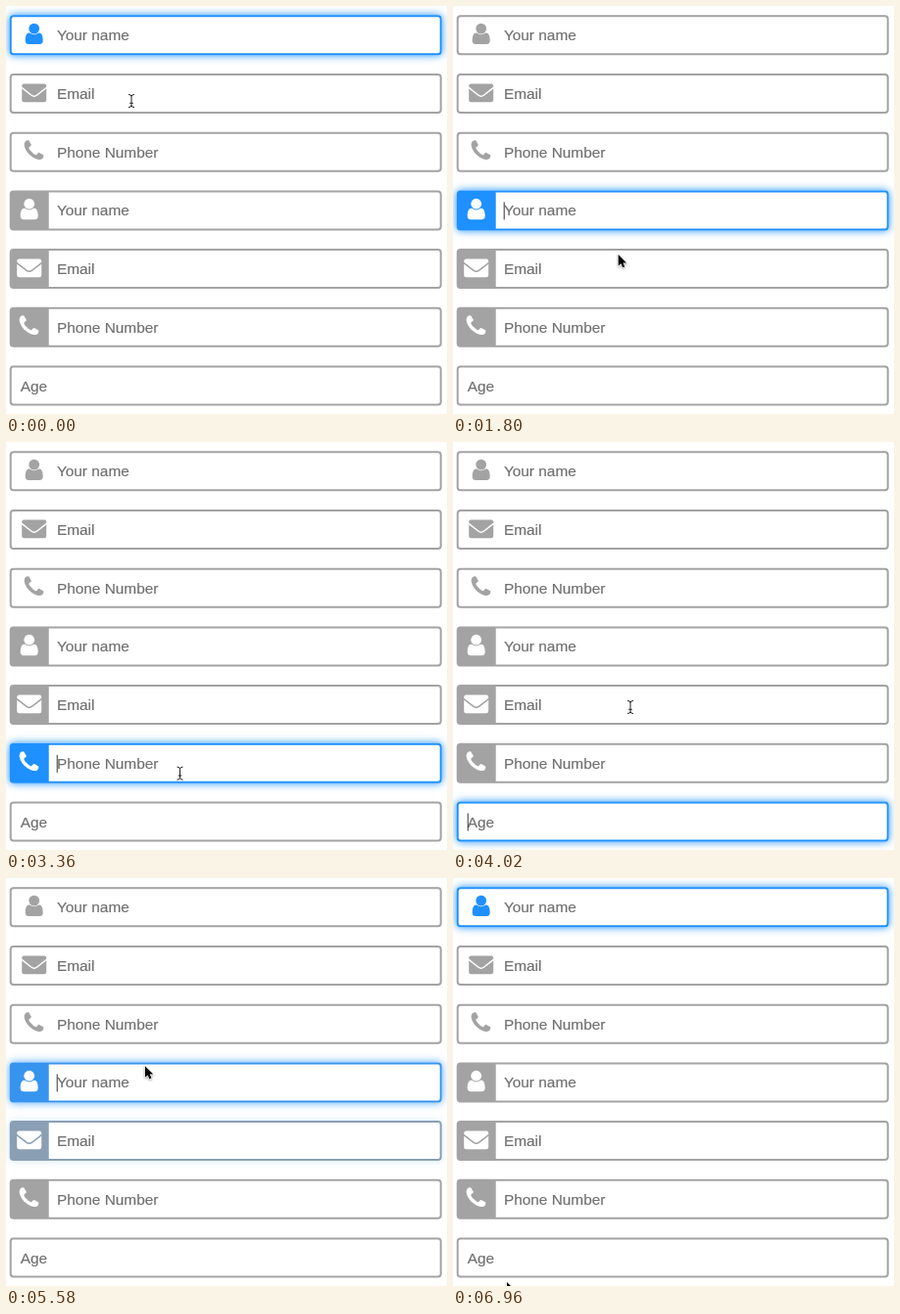
An HTML page that plays this animation: 450 px wide and 417 px high, repeating every 7020 ms.

```html
<!DOCTYPE html>
<html lang="en">
<head>
<meta charset="utf-8">
<title>Input focus</title>
<style>
  html, body { margin: 0; width: 100%; height: 100%; overflow: hidden; background: #fff; }
  #stage { position: relative; width: 450px; height: 417px; overflow: hidden; }
  .row {
    position: absolute; left: 0; top: 0; width: 441px; height: 41px; box-sizing: border-box;
    border: 2px solid var(--c); border-radius: 4px;
    box-shadow: 0 0 8px rgb(30 144 255 / var(--k));
    font: 15.4px/37px "Liberation Sans", Arial, sans-serif;
    color: #707070; -webkit-text-stroke: .2px #707070;
  }
  .row > * { position: absolute; }
  .row span { left: 46.2px; top: 0; white-space: nowrap; }
  .row i { left: 46px; top: 10px; width: 1px; height: 18px; background: #333; }
  .row svg { left: 22.5px; top: 17px; width: 1px; height: 1px; overflow: visible; fill: var(--c); stroke: #fff; }
  .row b { left: -1px; top: -1px; width: 39px; height: 39px; background: var(--c); border-radius: 2px 0 0 2px; }
  .filled svg { left: 18px; fill: #fff; stroke: var(--c); }
  .bare span { left: 9px; }
  .bare i { left: 9px; }
  #pointer { position: absolute; left: 0; top: 0; width: 1px; height: 1px; overflow: visible; }
  #arrow { stroke: #fff; stroke-width: 1.2; paint-order: stroke; filter: drop-shadow(0 1px 1px rgb(0 0 0 / .35)); }
  #beam { fill: none; stroke: #222; filter: drop-shadow(0 0 .6px #fff); }
</style>
</head>
<body>
<div id="stage"></div>
<script>
const LOOP = 7020, STEP = 60, FADE = 300, GLIDE = 300, BLINK = 500;
const PITCH = 59.7, TOP = 9.3, HEIGHT = 41;
const GRAY = [163, 163, 163], BLUE = [30, 144, 255];

// half of the handset; the other half is its mirror image
const half = 'M-4.4 5Q-7.7 1.7-8.9-1.4Q-9.9-4-9.9-5.1Q-9.9-9.9-5.7-9.9Q-5-9.9-4.7-8.8L-3.3-6.4Q-2.7-5.4-2.7-5.1Q-2.7-4.6-3.9-3.6T-5.2-2.3Q-5.2-.8-1.9 2.5Z';
const icons = {
  user: `<g stroke="none"><circle cy="-5.2" r="5.4"/>
    <path d="M-9 7C-9 1-7-.7-4.6-.7Q0 2.7 4.6-.7C7-.7 9 1 9 7Q9 10.8 5.6 10.8H-5.6Q-9 10.8-9 7Z"/></g>`,
  mail: `<g transform="translate(0 .8)"><rect x="-12.5" y="-9.4" width="25" height="18.8" rx="2.2" stroke="none"/>
    <path d="M-13-5.6L-3 2.2Q0 4.5 3 2.2L13-5.6" fill="none" stroke-width="1.5"/></g>`,
  phone: `<g stroke="none" transform="translate(-.2 -.6)"><path d="${half}"/>
    <path d="${half}" transform="matrix(0 -1 -1 0 0 0)"/></g>`,
};
const labels = { user: 'Your name', mail: 'Email', phone: 'Phone Number' };

// pointer stops: [arrival, x, y, pause before the click]; no pause means no click
const stops = [
  [0, 128, 97, 180], [840, 121, 142, 0], [1440, 152, 222, 60], [1910, 176, 268, 360],
  [2640, 177, 332, 400], [3600, 182, 396, 90], [4020, 181, 271], [4380, 176, 330, 100],
  [4900, 162, 270, 60], [5360, 144, 214, 60], [5760, 138, 152, 60], [6030, 134, 90, 60],
  [6300, 130, 36, 60], [6660, 50, 240], [6960, 55, 413],
];
const clicks = stops.filter(s => s.length > 3)
  .map(([time, , y, pause]) => ({ time: time + pause, row: Math.floor(y / PITCH) }));

const clamp = x => Math.min(1, Math.max(0, x));
const smooth = x => x * x * (3 - 2 * x);
const easeOut = x => 1 - (1 - x) ** 2.2;
const mix = (a, b, u) => a + (b - a) * u;

const stage = document.getElementById('stage');
const rows = [];
function addRow(kind, label, content) {
  const el = document.createElement('div');
  el.className = 'row ' + kind;
  el.style.transform = `translate(3.7px, ${TOP + rows.length * PITCH}px)`;
  el.innerHTML = `${content}<span>${label}</span><i></i>`;
  stage.append(el);
  rows.push({ el, caret: el.querySelector('i') });
}
for (const kind of ['plain', 'filled'])
  for (const name in icons)
    addRow(kind, labels[name], `${kind === 'filled' ? '<b></b>' : ''}<svg>${icons[name]}</svg>`);
addRow('bare', 'Age', '');

stage.insertAdjacentHTML('beforeend', `<svg id="pointer">
  <path id="arrow" d="M0 0V11.6L2.7 9.2L4.5 13.3L6.6 12.4L4.8 8.4H8.3Z"/>
  <path id="beam" d="M-3-6.5Q0-6.5 0-4.5Q0-6.5 3-6.5M0-4.5V4.5M-3 6.5Q0 6.5 0 4.5Q0 6.5 3 6.5M-1.8 2.3H1.8"/></svg>`);
const [pointer, arrow, beam] = ['pointer', 'arrow', 'beam'].map(id => document.getElementById(id));

function pointAt(t) {
  const n = stops.findLastIndex(s => s[0] <= t);
  const [time, x, y] = stops[n];
  const [next, nx, ny] = stops[n + 1] || [LOOP, x, y];
  const start = Math.max(time, next - GLIDE);
  const u = smooth(clamp((t - start) / (next - start)));
  return [mix(x, nx, u), mix(y, ny, u)];
}

function render(t) {
  const n = clicks.findLastIndex(c => c.time <= t);
  const now = clicks.at(n), last = clicks.at(n - 1);
  const age = (t - now.time + LOOP) % LOOP;
  const level = easeOut(clamp(age / FADE));
  rows.forEach(({ el, caret }, i) => {
    const active = i === now.row;
    const k = active ? level : i === last.row ? 1 - level : 0;
    el.style.setProperty('--c', `rgb(${GRAY.map((g, j) => mix(g, BLUE[j], k))})`);
    el.style.setProperty('--k', k);
    caret.hidden = !active || age % (2 * BLINK) >= BLINK;
  });

  const [x, y] = pointAt(t);
  const inset = (y - TOP) % PITCH;
  const inField = inset > 9 && inset < HEIGHT - 9;
  pointer.style.transform = `translate(${x}px, ${y}px)`;
  arrow.style.display = inField ? 'none' : '';
  beam.style.display = inField ? '' : 'none';
}

const start = performance.now();
function tick() {
  const t = (performance.now() - start) % LOOP;
  render(Math.floor(t / STEP) * STEP);
  requestAnimationFrame(tick);
}
tick();
</script>
</body>
</html>
```
